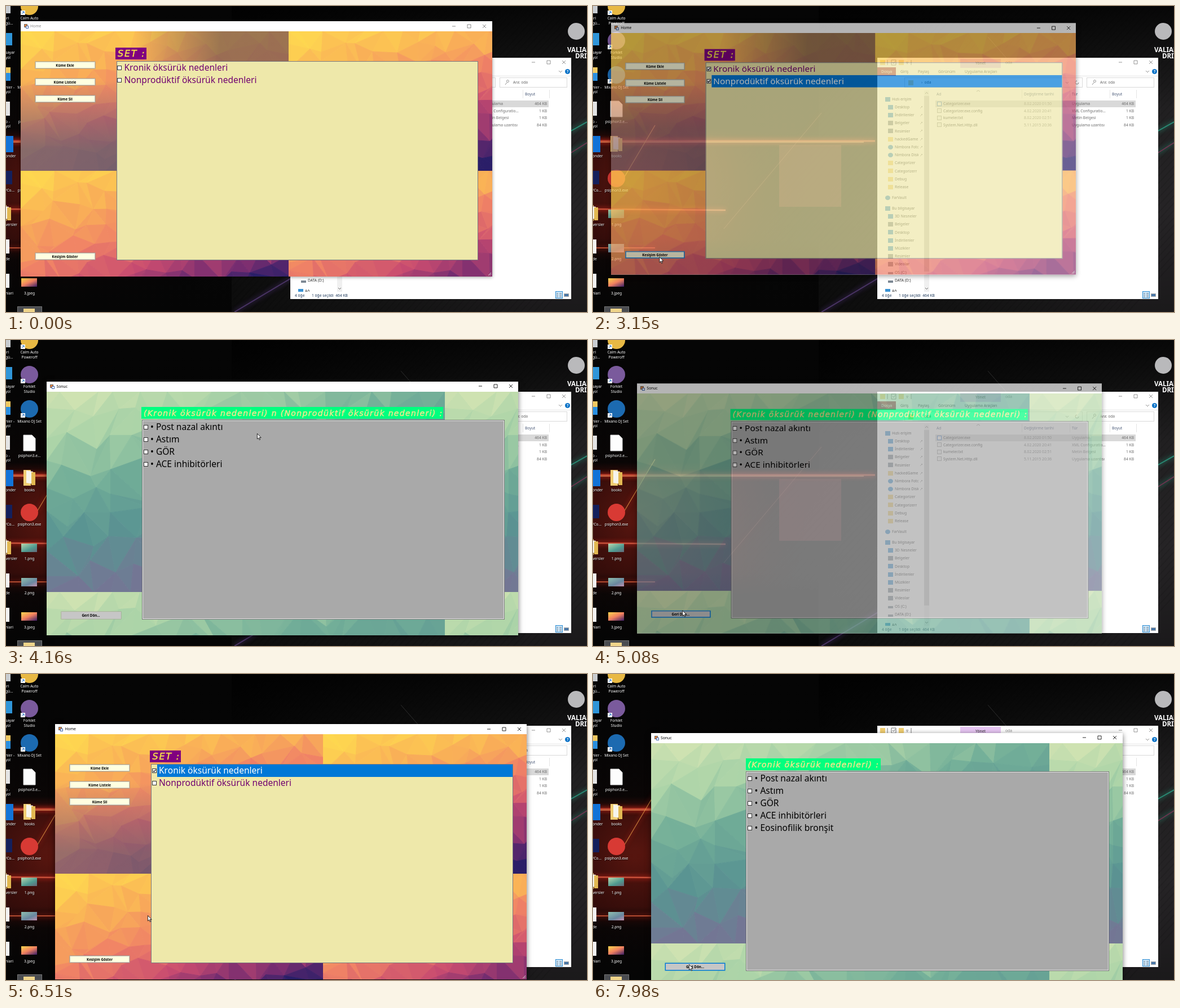
Animation, 1030 px wide and 544 px high, one loop 8000 ms. Source, as an HTML page with a canvas:

```html
<!DOCTYPE html>
<html lang="tr">
<head>
<meta charset="utf-8">
<title>Home</title>
<style>
html, body { margin: 0; width: 100%; height: 100%; overflow: hidden; background: #070707; }
#stage { position: absolute; left: 0; top: 0; width: 1030px; height: 544px; overflow: hidden;
  font-family: "Noto Sans", "Open Sans", sans-serif; color: #111; }
#stage div, #stage canvas, #stage svg { position: absolute; box-sizing: border-box; white-space: pre; }
#stage svg { overflow: visible; }
.win { background: #fff; box-shadow: 0 2px 9px rgba(0,0,0,.55); }
.btn { border: 1px solid #c4c4bc; box-shadow: 0 0 0 .5px #9a9a90; font-size: 6.2px; font-weight: 700;
  line-height: 11px; text-align: center; color: #000; }
.row { font-size: 15.55px; line-height: 21px; padding-left: 3.5px; }
.box { width: 8px; height: 8px; background: #fff; border: 1px solid #333; }
.hand { font-family: "DejaVu Sans", sans-serif; font-style: italic; -webkit-text-stroke: .5px currentColor; }
.icon { color: #fff; text-shadow: 0 1px 1px #000; font-size: 6.6px; line-height: 8.8px; }
</style>
</head>
<body>
<div id="stage"></div>
<script>
const stage = document.getElementById('stage');
const LOOP = 8000, STEP = 78;

function el(parent, x, y, w, h, css = '', text = '', cls = '') {
  const d = document.createElement('div');
  d.style.cssText = `left:${x}px;top:${y}px;` + (w ? `width:${w}px;` : '') + (h ? `height:${h}px;` : '') + css;
  d.textContent = text;
  d.className = cls;
  parent.append(d);
  return d;
}
// y is the middle of the line
function label(parent, x, y, size, text, css = '', cls = '') {
  return el(parent, x, y - size, 0, 0, `font-size:${size}px;line-height:${2 * size}px;${css}`, text, cls);
}
function path(parent, x, y, d, stroke, width = 1, fill = 'none') {
  const ns = 'http://www.w3.org/2000/svg';
  const s = document.createElementNS(ns, 'svg'), p = document.createElementNS(ns, 'path');
  s.style.cssText = `left:${x}px;top:${y}px;width:1px;height:1px`;
  for (const [k, v] of Object.entries({ d, stroke, fill, 'stroke-width': width })) p.setAttribute(k, v);
  s.append(p);
  parent.append(s);
  return s;
}
function canvas(parent, y, w, h) {
  const c = document.createElement('canvas');
  c.width = w; c.height = h;
  c.style.cssText = `left:0;top:${y}px`;
  if (parent) parent.append(c);
  return c;
}
function random(seed) {
  return () => (seed = (seed * 16807) % 2147483647) / 2147483647;
}

// ---- faceted backgrounds
function ramp(stops, p) {
  const q = Math.max(0, Math.min(.9999, p)) * (stops.length - 1), i = Math.floor(q);
  return 'rgb(' + stops[i].map((a, k) => Math.round(a + (stops[i + 1][k] - a) * (q - i))) + ')';
}
function facets(w, h, cell, stops, shade, seed) {
  const c = canvas(null, 0, w, h), g = c.getContext('2d'), rnd = random(seed);
  const nx = Math.round(w / cell), ny = Math.round(h / cell), pts = [];
  for (let j = 0; j <= ny; j++) for (let i = 0; i <= nx; i++) {
    const jx = i % nx ? (rnd() - .5) * .85 : 0, jy = j % ny ? (rnd() - .5) * .85 : 0;
    pts.push([(i + jx) * w / nx, (j + jy) * h / ny]);
  }
  const tri = (...n) => {
    const t = n.map(k => pts[k]);
    const u = (t[0][0] + t[1][0] + t[2][0]) / 3 / w, v = (t[0][1] + t[1][1] + t[2][1]) / 3 / h;
    g.fillStyle = g.strokeStyle = ramp(stops, shade(u, v) + (rnd() - .5) * .07);
    g.beginPath();
    t.forEach(p => g.lineTo(...p));
    g.closePath(); g.fill(); g.stroke();
  };
  for (let j = 0; j < ny; j++) for (let i = 0; i < nx; i++) {
    const a = j * (nx + 1) + i, b = a + 1, d = a + nx + 1, e = d + 1;
    if (rnd() < .5) { tri(a, b, d); tri(b, e, d); } else { tri(a, b, e); tri(a, e, d); }
  }
  return c;
}
const sunset = facets(475, 248, 31, [[255,222,78],[250,180,86],[240,130,102],[200,75,112],[120,45,112],[42,30,104]],
  (u, v) => .04 + .18 * u + .5 * v ** 1.15 + .55 * u * v, 41);
const meadow = facets(706, 356, 42, [[217,230,180],[172,212,168],[114,174,152],[90,148,146],[115,118,148]],
  (u, v) => .02 + .46 * u + .95 * v - .1 * u * v, 97);

// ---- wallpaper
function wallpaper() {
  const g = canvas(stage, 0, 1030, 544).getContext('2d');
  const fill = (grad, ...colors) => {
    colors.forEach((c, i) => grad.addColorStop(i / (colors.length - 1), c));
    g.fillStyle = grad;
    g.fillRect(0, 0, 1030, 544);
  };
  const line = (color, width, ...p) => {
    g.strokeStyle = color; g.lineWidth = width;
    g.beginPath();
    for (let i = 0; i < p.length; i += 2) g.lineTo(p[i], p[i + 1]);
    g.stroke();
  };
  fill(g.createLinearGradient(400, 0, 1030, 360), '#050505', '#101010', '#1a1a1a', '#262426');
  for (let i = 0; i < 90; i++) line('rgba(0,0,0,.1)', 2, 380 + i * 12, 0, i * 12 - 120, 544);
  fill(g.createLinearGradient(0, 0, 0, 544), 'rgba(0,0,0,.75)', 'rgba(0,0,0,0)', 'rgba(0,0,0,0)', 'rgba(0,0,0,.3)');
  fill(g.createRadialGradient(75, 320, 10, 75, 320, 310), 'rgba(112,26,18,.75)', 'rgba(60,12,10,.6)', 'rgba(20,0,0,0)');
  const veil = g.createLinearGradient(0, 0, 0, 544);
  [[0, 1], [.4, .9], [.45, 0], [.76, 0], [.83, .85], [1, 1]].forEach(([p, a]) => veil.addColorStop(p, `rgba(5,5,5,${a})`));
  g.fillStyle = veil;
  g.fillRect(0, 0, 400, 544);
  g.fillStyle = 'rgba(190,70,80,.28)';
  g.fillRect(330, 247, 110, 110);
  g.shadowBlur = 9; g.shadowColor = '#ff3020';
  line('#b84832', 3, 0, 240, 500, 240);
  line('#ffa468', 1, 0, 242, 480, 242);
  line('#c8503a', 2.5, 0, 361, 235, 363);
  line('#d8603c', 1.5, 0, 430, 110, 430);
  line('rgba(224,150,70,.8)', 1.2, 110, 212, 55, 305);
  line('rgba(220,130,120,.3)', 1, 232, 396, 405, 190);
  g.shadowColor = '#30c8a0';
  line('#2a8a74', 2, 1000, 223, 1030, 206);
  line('#703450', 1.5, 1000, 262, 1030, 243);
  g.shadowColor = '#a060ff';
  line('rgba(106,74,144,.6)', 2, 405, 544, 512, 480);
  g.shadowBlur = 0;
  line('rgba(150,150,150,.25)', 1, 700, 55, 735, 95);
}
wallpaper();

// ---- desktop icons
const round = 'border-radius:50%;';
const ROW = 61.1;
function desktop() {
  el(stage, 996, 30, 30, 30, round + 'background:#b9b9bb');
  ['VALIANT', 'DRIVERS'].forEach((s, i) => label(stage, 995 + 14 * i, 77 + 11 * i, 11.5, s, 'color:#fff;font-weight:900;'));

  const folder = (x, y) => {
    el(stage, x, y, 13, 28, 'background:#f0cd72');
    el(stage, x + 5, y + 2, 12, 22, 'background:#f6f4ec;transform:skewY(10deg)');
    el(stage, x + 14, y + 4, 7, 23, 'background:#e2b852');
  };
  const dot = color => y => el(stage, 26, y, 31, 31, round + 'background:' + color);
  const thumb = colors => y => el(stage, 27, y + 10, 28, 15, `background:linear-gradient(155deg,${colors})`);
  const page = y => path(stage, 31, y + 1, 'M0 0H15L21 6V28H0Z', '#ddd', 1, '#fdfdfd');
  const right = [['Calm Auto\nPoweroff', dot('#e8b944')], ['Forklet\nStudio', dot('#7a5a9c')],
    ['Mixano DJ Set', dot('#1c6ab0')], ['psiphon3.e...', page], ['books', y => folder(31, y + 2)],
    ['psiphon3.exe', dot('#d83a34')], ['1.png', thumb('#b8d8b0,#4f9a90 60%,#667')],
    ['2.png', thumb('#8fc0b0,#6a88a0 60%,#c090b0')], ['3.jpeg', thumb('#ffd84e,#f08060 50%,#3a1e68')]];
  const slab = (w, h, css) => y => el(stage, 0, y + 2, w, h, 'background:' + css);
  const left = [['iri\ngü...', slab(8, 26, '#c8ccd0')], ['sayar\nyol', slab(11, 22, '#2f95d8')],
    ['nler -\nyol', slab(8, 24, 'linear-gradient(#f0c860 40%,#2a8fe0 40%)')], ['o -\nyol', slab(7, 25, '#e4e4e4')],
    ['onder', slab(13, 29, '#1273d8')], ['/Co...', slab(11, 24, '#14205c')], ['versler', y => folder(-12, y + 2)],
    ['de', slab(6, 25, '#f4f4f4')], ['nlari', slab(6, 25, '#f4f4f4')]];
  right.forEach(([s, icon], i) => {
    icon(-15 + ROW * i);
    el(stage, -3.5, 18.3 + ROW * i, 90, 0, 'text-align:center', s, 'icon');
    if (i > 2) return;
    el(stage, 26, 8 + ROW * i, 8, 8, 'background:#fff');
    path(stage, 26, 8 + ROW * i, 'M2 6L6 2M3 2H6V5', '#1668c0');
  });
  left.forEach(([s, icon], i) => {
    icon(-15 + ROW * i);
    el(stage, -1, 18.3 + ROW * i, 0, 0, '', s, 'icon');
  });
  el(stage, 20, 534, 44, 12, 'background:#4a4c50;border:1px solid #777');
  el(stage, 31, 538, 20, 9, 'background:#f0d58a');
}
desktop();

// ---- file manager
function caption(parent, x, y, color) {
  return path(parent, x, y, 'M-3 0H3M24 -3H30V3H24ZM51 -3L57 3M57 -3L51 3', color, .9);
}
function explorer() {
  const w = el(stage, 504, 92, 498, 429, 'background:#fff;overflow:hidden');
  const t = (x, y, s, css = '') => label(w, x - 504, y - 92, 6.7, s, 'color:#333;' + css);
  const r = (x, y, ww, h, css) => el(w, x - 504, y - 92, ww, h, css);
  const p = (x, y, d, c = '#777') => path(w, x - 504, y - 92, d, c, .8);
  const gold = '#f3cf70', blue = '#3a92d4', grey = '#7c8894', dim = 'color:#6d6d6d;';

  [509, 542, 559].forEach((x, i) => r(x, i < 2 ? 96 : 132, 9, 9, 'background:' + gold));
  p(522, 96, 'M0 0V9M7 0H15V9H7ZM9 4L11 6 14 2M33 4H37M34 6L35 7 36 6M42 0V9', '#555');
  r(651, 94, 72, 16, 'background:#e7c6f3');
  t(678, 102, 'Yönet'); t(731, 101, 'oda', 'color:#888;');
  caption(w, 431, 8, '#888');
  r(504, 109, 33, 15, 'background:#a01c3c'); t(511, 117, 'Dosya', 'color:#fff;');
  t(545, 117, 'Giriş'); t(576, 117, 'Paylaş'); t(612, 117, 'Görünüm'); t(659, 117, 'Uygulama Araçları');
  p(980, 115, 'M0 0L3 3 6 0');
  r(991, 112, 9, 9, round + 'background:#0d74c8'); t(994, 116.5, '?', 'color:#fff;font-weight:700;');
  r(504, 124, 498, 1, 'background:#e4e4e4');
  r(552, 127, 316, 18, 'border:1px solid #d9d9d9');
  t(582, 136, '›  oda'); p(838, 135, 'M0 0L2.5 2.5 5 0M20 -2A3 3 0 1 0 23 1');
  r(875, 127, 120, 18, 'border:1px solid #d9d9d9');
  p(888, 133, 'M0 2A2 2 0 1 1 .1 2.1M0 3L-3 7'); t(899, 136, 'Ara: oda', 'color:#666;');

  const cols = [['Ad', 609], ['Değiştirme tarihi', 764], ['Tür', 849], ['Boyut', 920]];
  cols.forEach(([s, x], i) => {
    t(x, 156.5, s, 'color:#4a5a78;');
    r(i ? x - 4 : 963, 149, 1, 15, 'background:#e5e5e5');
  });
  p(680, 152, 'M0 0L3 -2 6 0');
  r(607, 167.5, 355, 12.5, 'background:#d9d9d9');
  const files = [['Categorizer.exe', '8.02.2020 01:50', 'Uygulama', '464 KB'],
    ['Categorizer.exe.config', '4.02.2020 20:41', 'XML Configuratio...', '1 KB'],
    ['kumeler.txt', '8.02.2020 02:51', 'Metin Belgesi', '1 KB'],
    ['System.Net.Http.dll', '5.11.2015 20:36', 'Uygulama uzantısı', '84 KB']];
  files.forEach(([name, date, kind, size], i) => {
    const y = 174 + i * 12.4;
    r(610, y - 4, 8, 8, 'background:#f4f4f4;border:1px solid ' + (i ? '#999' : '#2f6fc0'));
    t(621, y, name); t(764, y, date, dim); t(849, y, kind, dim);
    t(909, y, size, dim + 'width:50px;text-align:right;');
  });

  const tree = ['*Hızlı erişim', 'Desktop', 'İndirilenler', 'Belgeler', 'Resimler', 'hackedGame', 'Nimbora Foto', 'Nimbora Disk',
    'Categorizer', 'Categorizerr', 'Debug', 'Release', '*FarVault', '*Bu bilgisayar', '3D Nesneler', 'Belgeler',
    'Desktop', 'İndirilenler', 'Müzikler', 'Resimler', 'Videolar', 'OS (C:)', 'DATA (D:)', '*Ağ'];
  let y = 146.5;
  tree.forEach((s, i) => {
    const top = s[0] === '*', drive = s.includes(':');
    const color = /hacked|Categ|Debug|Rel/.test(s) ? gold : /Belg|Resim|Video|:/.test(s) ? grey : blue;
    y += top ? 19 : 14.2;
    r(top ? 518 : 523, drive ? y : y - 4, 9, drive ? 4 : 8,
      `background:${color};` + (/Nimbora|FarVault/.test(s) ? round : ''));
    t(top ? 530 : 535, y, s.replace('*', ''));
    if (i > 0 && i < 8) { r(577, y - 5, 10, 10, 'background:#fff'); p(580, y, 'M0 2L4 -2M2 -2L4 0', '#888'); }
  });
  r(587, 150, 9, 358, 'background:#f0f0f0'); r(587, 160, 9, 312, 'background:#cdcdcd');
  p(589, 155, 'M0 1L2.5 -1.5 5 1M0 346L2.5 348.5 5 346', '#444');
  r(504, 508, 498, 13, 'background:#fff');
  t(512, 514.5, '4 öğe', 'color:#1e395b;'); t(542, 514.5, '1 öğe seçildi  464 KB', 'color:#1e395b;');
  r(974, 507, 13, 13, 'background:#cfe8fa;border:1px solid #2a8ad0');
  p(976, 511, 'M0 0H3M5 0H9M0 3H3M5 3H9M0 6H3M5 6H9', '#456');
  r(989, 511, 9, 6, 'background:#4a78a8;border:1px solid #aaa');
}
explorer();

// ---- application windows
function appWindow(x, y, h, title, tile) {
  const root = el(stage, x, y, 836, h, '', '', 'win');
  const g = canvas(root, 18, 836, h - 18).getContext('2d');
  g.fillStyle = g.createPattern(tile, 'repeat');
  g.fillRect(0, 0, 836, h);
  el(root, 6, 5, 6, 6, 'background:#e8843c;border:1px solid #666');
  el(root, 9, 8, 5, 5, 'background:#fff;border:1px solid #3a62a8');
  const name = label(root, 17.5, 9, 6.8, title, 'color:#000;');
  return { root, name, caps: caption(root, 768.5, 8.5, '#111') };
}
function addRows(win, items, top, ink) {
  win.ink = ink;
  win.rows = items.map((s, i) => el(win.root, 180.5, top + 22 * i, 630, 22, '', s, 'row'));
  win.ticks = items.map((s, i) => {
    el(win.root, 171.5, top + 7 + 22 * i, 0, 0, '', '', 'box');
    return path(win.root, 171.5, top + 7 + 22 * i, 'M1.8 4L3.4 5.8 6.4 2', '#111', 1.2);
  });
}
function homeWindow(x, y, dull) {
  const win = appWindow(x, y, 454, 'Home', sunset), { root } = win;
  el(root, 0, 18, 171, 248, `background:linear-gradient(transparent 35%,rgba(118,104,106,${dull ? .85 : .7}) 85%)`);
  if (dull) el(root, 171, 18, 304, 54, 'background:linear-gradient(90deg,transparent 10%,rgba(125,98,78,.75) 60%)');
  el(root, 168, 47, 55, 20.5, 'background:#800080');
  label(root, 172.5, 57.5, 16, 'SET :', 'color:#f5e04a;letter-spacing:1.8px;', 'hand');
  el(root, 170, 71, 641.5, 353.5, 'background:#eee8aa;border:1px solid #7a7a82');
  const texts = ['Küme Ekle', 'Küme Listele', 'Küme Sil', 'Kesişim Göster'];
  win.btn = texts.map((s, i) => el(root, 26, i < 3 ? 71.5 + 30 * i : 411.5, 106, 12.5, 'background:#ffffe1', s, 'btn')).pop();
  addRows(win, ['Kronik öksürük nedenleri', 'Nonprodüktif öksürük nedenleri'], 72, '#700070');
  path(root, 829, 447, 'M0 5L5 0M2.5 5L5 2.5', '#ddd', .9);
  return win;
}
function resultWindow(x, y, heading, width, items) {
  const win = appWindow(x, y, 451, 'Sonuc', meadow), { root } = win;
  el(root, 168, 45.5, width, 20.5, 'background:#00ff7f');
  label(root, 172, 56, 14, heading, 'color:#f0e68c;letter-spacing:1.35px;', 'hand');
  el(root, 169.5, 69, 641.5, 353.5, 'background:#a9a9a9;border:1px solid #e4e4e4;outline:.5px solid #777');
  win.btn = el(root, 25.5, 409.8, 106, 12.5, 'background:#c6c6c6', 'Geri Dön...', 'btn');
  addRows(win, items.map(s => '• ' + s), 70, '#000');
  return win;
}
const causes = ['Post nazal akıntı', 'Astım', 'GÖR', 'ACE inhibitörleri'];
const both = '(Kronik öksürük nedenleri) n (Nonprodüktif öksürük nedenleri) :';

// times at which each window opens, closes, gains focus; picks and ticks are per row
const windows = [
  { ...homeWindow(25.5, 27, true), open: -LOOP, close: 3072, focus: 1360, hover: 2690, picks: [1360, 1990], checks: [1510, 2140] },
  { ...resultWindow(72, 73.5, both, 535, causes), open: 3228, close: 5006, hover: 4620 },
  { ...homeWindow(87, 89, false), open: 5084, close: 7122, hover: 6800, picks: [6120], checks: [6120] },
  { ...resultWindow(102.5, 104.5, '(Kronik öksürük nedenleri) :', 239, [...causes, 'Eosinofilik bronşit']),
    open: 7200, close: LOOP, hover: 7820 },
];

// pointer moves: start, end, x, y
const pointer = path(stage, 0, 0, 'M.4 .4V10L2.6 8 4.2 11.6 5.7 11 4.1 7.5H7.2Z', '#000', .8, '#fff');
const enter = 360, entry = [899, 525];
const moves = [[enter, 1060, 214, 107], [1760, 1910, 216, 133], [2140, 2920, 115, 449], [3000, 3384, 122, 440],
  [3390, 3930, 440, 152], [4010, 4164, 445, 166], [4164, 4780, 153, 487], [4850, 5240, 161, 477], [5240, 5630, 286, 172],
  [5800, 5950, 270, 162], [6120, 6505, 251, 429], [6505, 6890, 166, 505], [7750, 7980, 170, 516]];

function phase(t, start, length) {
  const f = Math.floor((t - start) / STEP + .1) * STEP / length;
  return Math.max(0, Math.min(1, f));
}
const smooth = f => f * f * (3 - 2 * f);

function drawWindow(w, t) {
  const shown = 1 - (1 - phase(t, w.open, 4 * STEP)) ** 1.5, gone = phase(t, w.close, 260);
  const s = w.root.style, alpha = shown * (1 - gone), active = t >= (w.focus ?? 0);
  s.visibility = alpha > 0 ? 'visible' : 'hidden';
  s.opacity = alpha;
  s.transform = alpha < 1 ? `scale(${.96 + .04 * shown - .048 * gone})` : 'none';
  s.boxShadow = active ? '' : '0 1px 6px rgba(0,0,0,.4)';
  w.name.style.color = active ? '#000' : '#8a8a8a';
  w.caps.style.opacity = active ? 1 : .55;
  const { picks = [], checks = [] } = w;
  const pick = picks.filter(p => p <= t).length - 1;
  w.rows.forEach((r, i) => {
    r.style.background = i === pick ? '#0078d7' : 'none';
    r.style.color = i === pick ? '#fff' : w.ink;
    w.ticks[i].style.display = t >= checks[i] ? 'block' : 'none';
  });
  const hot = t >= w.hover;
  w.btn.style.borderColor = hot ? '#0078d7' : '';
  w.btn.style.boxShadow = hot ? '0 0 0 .5px #0078d7' : '';
}
function drawPointer(t) {
  let [x, y] = entry;
  for (const [start, end, tx, ty] of moves) {
    const f = smooth(phase(t, start, end - start));
    x += (tx - x) * f;
    y += (ty - y) * f;
  }
  pointer.style.display = t < enter ? 'none' : 'block';
  pointer.style.transform = `translate(${x}px,${y}px)`;
}
function tick() {
  const t = performance.now() % LOOP;
  windows.forEach(w => drawWindow(w, t));
  drawPointer(t);
  requestAnimationFrame(tick);
}
tick();
</script>
</body>
</html>
```
